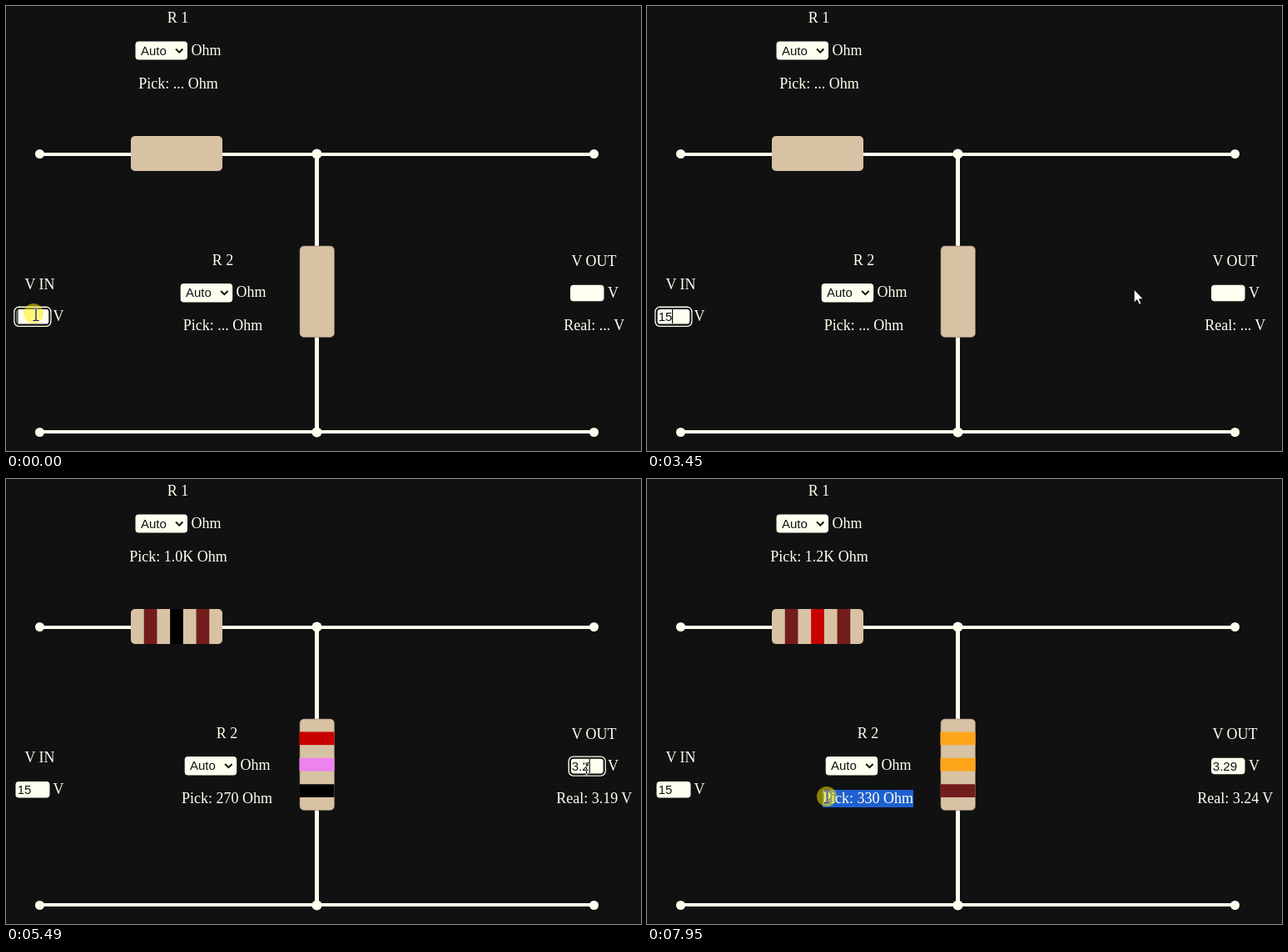
These frames come from a looping animation (763x534 px, 8000 ms). An HTML page:

```html
<!DOCTYPE html>
<html lang="en">
<head>
<meta charset="utf-8">
<title>Voltage divider</title>
<style>
  html, body { margin: 0; width: 100%; height: 100%; overflow: hidden; background: #111; }
  svg { display: block; width: 763px; height: 534px; }
  text { font: 18px "Liberation Serif", "Times New Roman", serif; fill: #fffff0; }
  .mid { text-anchor: middle; }
  .ui { font: 15px "Liberation Sans", Arial, sans-serif; fill: #111; }
  .paper { fill: #fffff0; }
  .wire { stroke: #fffff0; stroke-width: 4; fill: none; }
  .body { fill: #d8c2a4; }
  .chevron { fill: none; stroke: #111; stroke-width: 2; }
  #beam { mix-blend-mode: difference; }
</style>
</head>
<body>
<svg viewBox="0 0 763 534">
  <rect width="763" height="534" fill="#111"/>
  <path class="wire" d="M40 178H707M40 511H707"/>
  <path class="wire" d="M373.5 178V511" style="stroke-width:5"/>
  <g class="paper">
    <circle cx="40.5" cy="177.5" r="5.5"/><circle cx="373.5" cy="177.5" r="6"/><circle cx="706.5" cy="177.5" r="5.5"/>
    <circle cx="40.5" cy="511.5" r="5.5"/><circle cx="373.5" cy="511.5" r="6"/><circle cx="706.5" cy="511.5" r="5.5"/>
  </g>

  <rect class="body" x="150" y="156" width="110" height="42" rx="5"/>
  <g id="bands1" transform="translate(150 156)"></g>
  <rect class="body" x="353" y="288" width="41.5" height="109.5" rx="5" stroke="#8a7a66" stroke-width=".6"/>
  <g id="bands2" transform="translate(394.5 287.7) rotate(90)"></g>

  <text class="mid" x="206.5" y="20">R 1</text>
  <rect class="paper" x="155.5" y="42.5" width="62.5" height="22" rx="4"/>
  <text class="ui" x="162" y="59">Auto</text>
  <path class="chevron" d="M204 51.5l4.2 4.2 4.2-4.2"/>
  <text x="222.5" y="59">Ohm</text>
  <text class="mid" id="pick1" x="207" y="99"></text>

  <g id="group2">
    <text class="mid" x="260.5" y="311">R 2</text>
    <rect class="paper" x="209.7" y="333" width="62.5" height="22.5" rx="4"/>
    <text class="ui" x="216" y="349">Auto</text>
    <path class="chevron" d="M258.2 342l4.2 4.2 4.2-4.2"/>
    <text x="276.5" y="349">Ohm</text>
    <rect id="mark" y="373" height="21" fill="#1f60d0"/>
    <text class="mid" id="pick2" x="260.5" y="389"></text>
  </g>

  <text class="mid" x="40.5" y="340">V IN</text>
  <text x="56.5" y="378">V</text>
  <text class="mid" x="706.5" y="312">V OUT</text>
  <text x="723" y="350">V</text>
  <text class="mid" id="real" x="706.8" y="389"></text>

  <rect class="paper" x="11.5" y="363" width="41" height="19.5" rx="4"/>
  <rect class="paper" x="678" y="334.8" width="40.5" height="19.5" rx="4"/>
  <g id="ring" fill="none">
    <rect x="-1.8" y="-1.7" width="44" height="23" rx="5.5" stroke="#fffff0" stroke-width="1.4"/>
    <rect x="0" y="0" width="40.5" height="19.5" rx="4" stroke="#111" stroke-width="1.8"/>
  </g>
  <text class="ui" id="vin" x="13.7" y="378"></text>
  <text class="ui" id="vout" x="679.8" y="350"></text>
  <rect id="caret" width="1.2" height="17" fill="#111"/>

  <circle id="press" r="12" fill="#ffec00" fill-opacity=".52"/>
  <path id="beam" fill="none" stroke="#fff" stroke-width="1.2" d="M-3.5-7.5H-1L0-6.5L1-7.5H3.5M0-6.5V6.5M-3.5 7.5H-1L0 6.5L1 7.5H3.5"/>
  <path id="arrow" fill="#fff" stroke="#000" stroke-width=".8" d="M0 0V16L3.7 12.6L6.2 18.2L8.6 17.2L6.2 11.7H11Z"/>
</svg>
<script>
const LOOP = 8000, BLINK = 510, FOCUS_OUT = 4140, DRAG = 7670;
const $ = id => document.getElementById(id);
const show = (id, on) => $(id).setAttribute('visibility', on ? 'visible' : 'hidden');
const move = (id, x, y) => $(id).setAttribute('transform', `translate(${x} ${y})`);

// Time of each edit and the content of the focused field after it
const edits = [[30, ''], [1790, '1'], [2120, '15'], [FOCUS_OUT, ''],
  [4980, '3'], [5160, '3.'], [5490, '3.2'], [5635, '3.29']];

const brown = '#731c1c', red = '#c80000', orange = '#ffa51a', violet = '#ee82ee', grey = '#808080', black = '#000';
const results = [
  { at: 0, r1: '...', r2: '...', out: '...', bands1: [], bands2: [] },
  { at: 4980, r1: '3.3K', r2: '820', out: '2.99', bands1: [orange, orange, brown], bands2: [grey, red, black] },
  { at: 5490, r1: '1.0K', r2: '270', out: '3.19', bands1: [brown, black, brown], bands2: [red, violet, black] },
  { at: 5635, r1: '1.2K', r2: '330', out: '3.24', bands1: [brown, red, brown], bands2: [orange, orange, brown] }
];

// Pointer path: time, x, y
const path = [[0, 36, 370], [309, 36, 370], [310, 35, 370], [2910, 35, 370], [3100, 130, 352],
  [3300, 400, 332], [3450, 585, 340], [3700, 645, 334], [3730, 648, 335], [4000, 697, 350],
  [4440, 697, 350], [4470, 697.5, 348], [6800, 697.5, 348], [6950, 630, 362], [7200, 420, 376],
  [7440, 320.5, 378], [DRAG, 320.5, 378], [7950, 216.5, 381], [LOOP, 216.5, 381]];

function pointer(t) {
  const i = path.findIndex(p => p[0] > t), [t0, x0, y0] = path[i - 1], [t1, x1, y1] = path[i];
  const k = (t - t0) / (t1 - t0);
  return [x0 + (x1 - x0) * k, y0 + (y1 - y0) * k];
}

function drawBands(id, colours) {
  const w = 110 / 7;
  $(id).innerHTML = colours.map((c, i) =>
    `<rect x="${w * (2 * i + 1)}" width="${w}" height="42" fill="${c}"/>`).join('');
}

let shown;
function showResult(r) {
  if (r === shown) return;
  shown = r;
  $('pick1').textContent = `Pick: ${r.r1} Ohm`;
  $('pick2').textContent = `Pick: ${r.r2} Ohm`;
  $('real').textContent = `Real: ${r.out} V`;
  drawBands('bands1', r.bands1);
  drawBands('bands2', r.bands2);
  move('group2', r.at ? 5 : 0, 0);
}

function select(t, x) {
  const text = $('pick2'), shift = 5, n = text.getNumberOfChars();
  const end = text.getEndPositionOfChar(n - 1).x;
  let start = end;
  for (let i = n - 1; i >= 0; i--) {
    const a = text.getStartPositionOfChar(i).x, b = text.getEndPositionOfChar(i).x;
    if ((a + b) / 2 + shift >= x - 1) start = a;
  }
  show('mark', t >= DRAG);
  $('mark').setAttribute('x', start);
  $('mark').setAttribute('width', end - start);
}

function draw(t) {
  showResult(results.findLast(r => r.at <= t));

  const onOut = t >= FOCUS_OUT, focused = t < DRAG;
  const [since, value] = edits.findLast(e => e[0] <= t) || edits[0];
  $('vin').textContent = onOut ? '15' : value;
  $('vout').textContent = onOut ? value : '';
  const field = $(onOut ? 'vout' : 'vin');
  const caretX = (onOut ? 679.8 : 13.3) + (value ? field.getComputedTextLength() : 0);
  move('caret', caretX, onOut ? 336 : 364);
  show('caret', focused && Math.trunc((t - since) / BLINK) % 2 === 0);
  move('ring', onOut ? 678 : 11.7, onOut ? 334.8 : 363);
  show('ring', focused);

  const [x, y] = pointer(t);
  const inField = x < 53 || (x > 677 && x < 719);
  const isBeam = inField || t >= 7420;
  move('beam', x, y);
  move('arrow', x, y);
  show('beam', isBeam);
  show('arrow', !isBeam);
  move('press', x - (t < 100 ? 3 : .5), y - (t < 100 ? 1 : 0));
  show('press', t < 100 || (t >= FOCUS_OUT && t < 4240) || t >= DRAG);
  select(t, x);
}

function tick() {
  draw(performance.now() % LOOP);
  requestAnimationFrame(tick);
}
tick();
</script>
</body>
</html>
```
